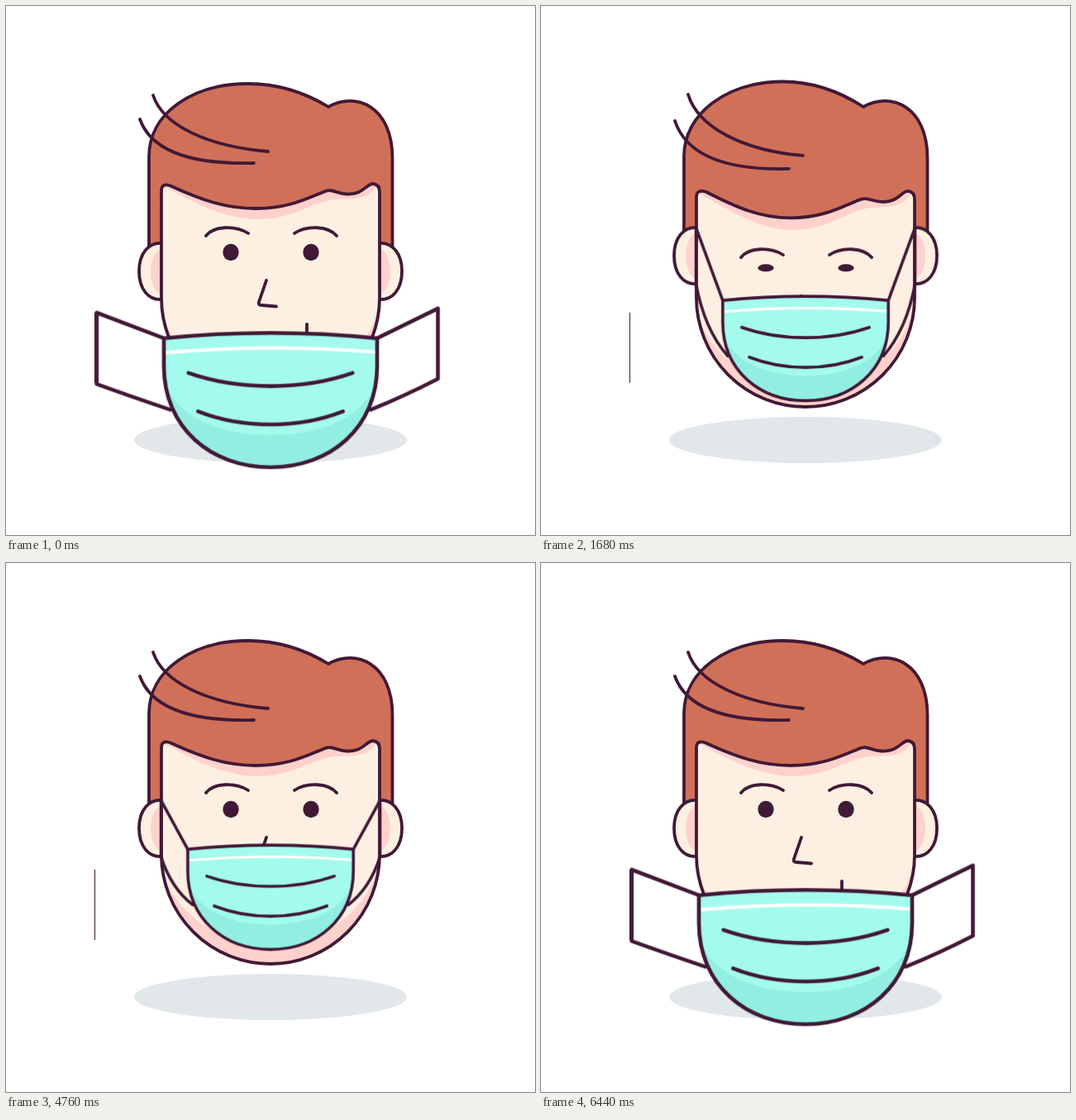
Animation of 640 by 640 pixels, one loop 7200 ms. Source, as an HTML page:

```html
<!DOCTYPE html>
<html lang="en">
<head>
<meta charset="utf-8">
<title>Face mask</title>
<style>
  html, body { margin: 0; width: 100%; height: 100%; overflow: hidden; background: #fff; }
  svg { display: block; width: 100vw; height: 100vh; }

  .line { fill: none; stroke: #411936; stroke-width: 3.8; stroke-linecap: round; stroke-linejoin: round; }
  .mask .line { stroke-width: 3.6; }
  .skin { fill: #fdf0e2; }
  .pink { fill: #ffd1cd; }
  .dark { fill: #411936; }

  .nod, .blink, .brow, .mask, .loop-l, .loop-r, .hair, .face, .fringe, .strand-a, .strand-b {
    animation: 7200ms cubic-bezier(.333, 0, .667, 1) infinite;
  }
  .nod { animation-name: nod; }
  .blink { animation-name: blink; transform-box: fill-box; transform-origin: center; }
  .brow { animation-name: brow; }
  .mask { animation-name: mask; transform-origin: 320px 346px; }
  .loop-l { animation-name: loop-l; }
  .loop-r { animation-name: loop-r; }
  .hair { animation-name: hair; }
  .face { animation-name: face; }
  .fringe { animation-name: fringe; }
  .strand-a { animation-name: strand-a; }
  .strand-b { animation-name: strand-b; }
  .ears { --n: -19px; }
  .features { --n: 19px; }

  /* 24.444% = head fully down, 38.889% = head up, 65% - 89.444% = mask comes off */
  @keyframes nod {
    0%, 38.889%, 100% { transform: translateY(0); }
    24.444% { transform: translateY(var(--n)); }
  }
  @keyframes blink {
    0%, 21.667%, 27.222%, 100% { transform: scaleY(1); }
    24.444% { transform: scaleY(.15); }
  }
  @keyframes brow {
    0%, 21.667%, 27.222%, 100% { transform: translateY(0); }
    24.444% { transform: translateY(11px); }
  }
  @keyframes mask {
    0%, 89.444%, 100% { transform: translateY(56px) scale(1.29); }
    24.444% { transform: translateY(10px) scale(1); }
    38.889%, 65% { transform: translateY(0) scale(1); }
  }
  @keyframes loop-l {
    0%, 89.444%, 100% { d: path("M220 346L157 322L157 389Q193 402 226 413"); }
    24.444% { d: path("M220 346L188 258L188 326Q198 381 226 413"); }
    38.889%, 65% { d: path("M220 346L188 287L188 355Q200 393 226 413"); }
  }
  @keyframes loop-r {
    0%, 89.444%, 100% { d: path("M420 346L477 318L477 384Q446 400 414 413"); }
    24.444% { d: path("M420 346L452 258L452 326Q442 381 414 413"); }
    38.889%, 65% { d: path("M420 346L452 287L452 355Q440 393 414 413"); }
  }
  @keyframes hair {
    0%, 38.889%, 100% { d: path("M173 300L173 182C173 130 225 94 293 94C330 94 362 105 390 122C424 103 467.5 122 467.5 184L467.5 300"); }
    24.444% { d: path("M173 300L173 182C173 130 225 91.5 293 91.5C330 91.5 362 104 390 122C424 103 467.5 122 467.5 184L467.5 300"); }
  }
  @keyframes face {
    0%, 38.889%, 100% { d: path("M188 353L188 224Q188 213 200 218C235 234 265 245 302 245C340 245 362 234 384 225C394 220 400 227 412 227.5C432 229 436 215 444 215Q452 216 452 225L452 353A132 132 0 0 1 188 353Z"); }
    24.444% { d: path("M188 353L188 232Q188 221 200 225C235 243 265 256.5 302 256.5C340 256.5 362 244 384 235C394 230 400 236.5 412 237C432 238 436 224 444 224Q452 225 452 234L452 353A132 132 0 0 1 188 353Z"); }
  }
  @keyframes fringe {
    0%, 38.889%, 100% { d: path("M190 218C225 236 262 258 304 258C350 258 370 236 400 234C420 233 440 235 448 217L448 190L190 190Z"); }
    24.444% { d: path("M190 226C225 245 262 271 304 271C350 271 370 247 400 244C420 243 440 244 448 226L448 190L190 190Z"); }
  }
  @keyframes strand-a {
    0%, 38.889%, 100% { d: path("M178 108C190 145 245 170 317 176"); }
    24.444% { d: path("M178 107C190 147 245 175 317 181"); }
  }
  @keyframes strand-b {
    0%, 38.889%, 100% { d: path("M162 137C176 176 225 192 300 190"); }
    24.444% { d: path("M162 139C176 181 225 199 300 197"); }
  }
</style>
</head>
<body>
<svg viewBox="0 0 640 640">
  <defs>
    <clipPath id="face-clip"><path class="face"/></clipPath>
    <clipPath id="mask-clip"><path d="M220 346Q320 336 420 346V372C420 430 376 467 320 467S220 430 220 372Z"/></clipPath>
    <g id="ear">
      <path class="skin" d="M190 287C172 285 161 300 161 321S172 357 190 355Z"/>
      <ellipse class="pink" cx="190" cy="321" rx="15" ry="28"/>
      <path class="line" d="M190 287C172 285 161 300 161 321S172 357 190 355"/>
    </g>
  </defs>

  <ellipse cx="320" cy="525" rx="165" ry="28" fill="#e2e7ea"/>
  <rect class="dark" x="107" y="371" width="1" height="85"/>

  <path class="line hair" style="fill:#d17058"/>

  <g class="ears nod">
    <use href="#ear"/>
    <use href="#ear" transform="translate(640) scale(-1 1)"/>
  </g>

  <g clip-path="url(#face-clip)">
    <rect class="pink" x="180" y="200" width="280" height="300"/>
    <path class="skin" d="M186 200H452V345A133 116 0 0 1 186 345Z"/>
    <path class="pink fringe"/>
  </g>
  <path class="line face"/>
  <path class="line strand-a"/>
  <path class="line strand-b"/>

  <g class="features nod">
    <g class="brow">
      <path class="line" d="M242 278C251 266 277 265 293 275"/>
      <path class="line" d="M349 275C364 265 390 266 400 278"/>
    </g>
    <ellipse class="dark blink" cx="272" cy="298" rx="9.7" ry="10.2"/>
    <ellipse class="dark blink" cx="369" cy="298" rx="9.7" ry="10.2"/>
    <path class="line" d="M315 332L306 358Q305 362 309 362L327 363.5"/>
    <path class="line" d="M364 385V398"/>
  </g>

  <g class="mask">
    <path class="line loop-l"/>
    <path class="line loop-r"/>
    <g clip-path="url(#mask-clip)">
      <rect x="215" y="335" width="210" height="135" fill="#a3fbee"/>
      <path d="M220 386C232 420 272 437 320 437S408 420 420 386V470H220Z" fill="#91eee1"/>
      <path d="M221 359.5Q320 351 419 359" fill="none" stroke="#fff" stroke-width="3.2"/>
    </g>
    <path class="line" d="M220 346Q320 336 420 346V372C420 430 376 467 320 467S220 430 220 372Z"/>
    <path class="line" d="M243 378.5C290 395 350 395 397 378.5"/>
    <path class="line" d="M252 414.5C294 431 346 431 388 414.5"/>
  </g>
</svg>
</body>
</html>
```
